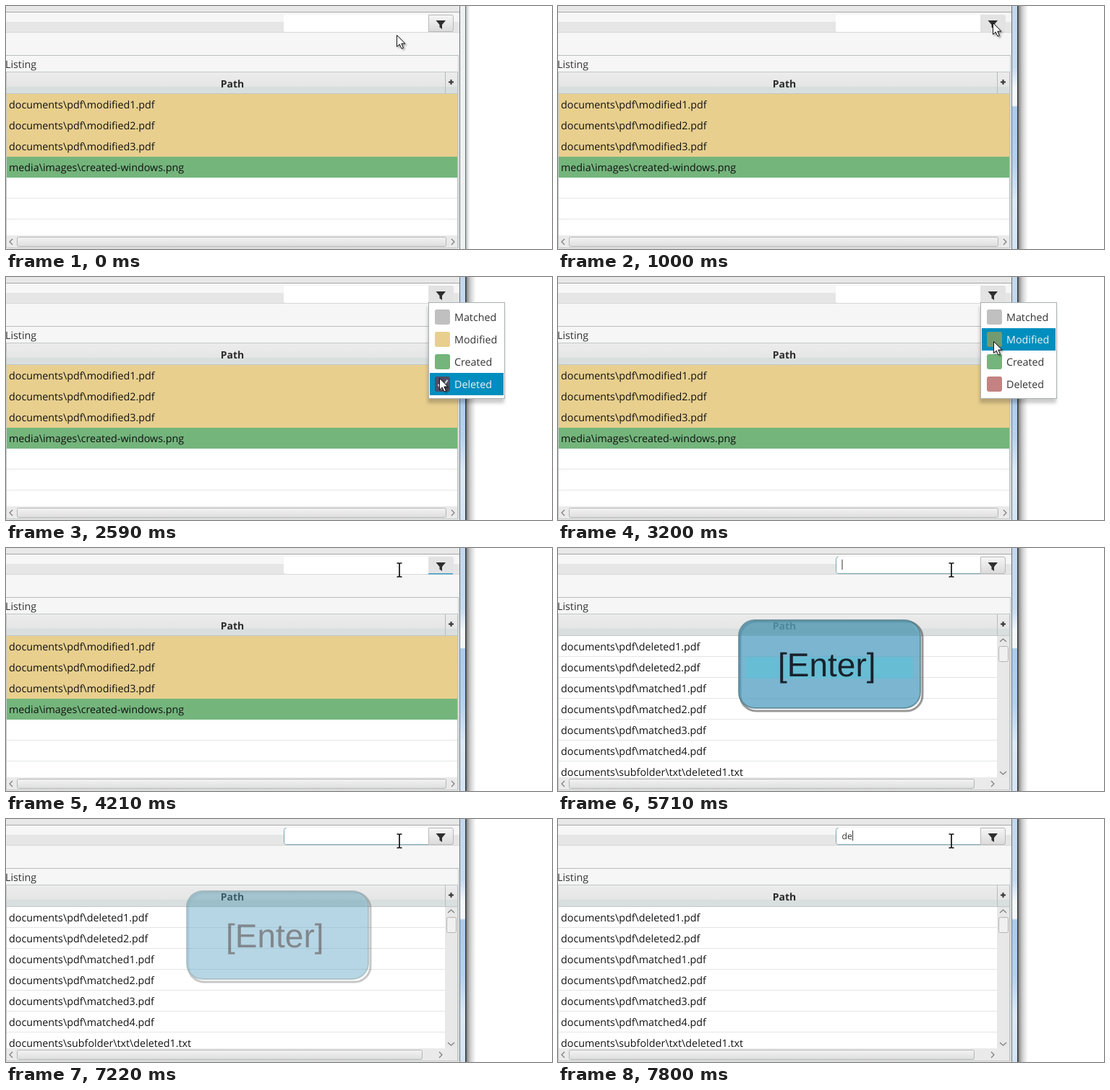
Recreate the animation shown at these times as an HTML page. Size 755x337 px, loop 8 s.

```html
<!DOCTYPE html>
<html lang="en">
<head>
<meta charset="utf-8">
<title>Filter listing</title>
<style>
html, body { margin: 0; width: 100%; height: 100%; overflow: hidden; background: #fff; }
svg { display: block; width: 755px; height: 337px; }
text { font: 14.3px "Open Sans", "Noto Sans", sans-serif; fill: #111; text-rendering: geometricPrecision; white-space: pre; }
.label { fill: #333; }
.head { font-weight: 700; font-size: 14px; fill: #2b2b2b; }
.typed { font-size: 12.2px; fill: #333; }
.key { font: 46px "Liberation Sans", Arial, sans-serif; fill: #18222c; }
.arrow { fill: none; stroke: #777; stroke-width: 1.1; }
#menu .frame { filter: drop-shadow(-1px 6px 2px rgba(0,0,0,.2)); }
#pointer { filter: drop-shadow(2px 2px 1px rgba(0,0,0,.35)); }
</style>
</head>
<body>
<svg viewBox="0 0 755 337">
  <defs>
    <linearGradient id="headFill" x2="0" y2="1"><stop stop-color="#ececec"/><stop offset="1" stop-color="#e2e2e2"/></linearGradient>
    <linearGradient id="buttonFill" x2="0" y2="1"><stop stop-color="#f6f6f6"/><stop offset="1" stop-color="#dadada"/></linearGradient>
    <linearGradient id="thumbFill" x2="0" y2="1"><stop stop-color="#f3f3f3"/><stop offset="1" stop-color="#dedede"/></linearGradient>
    <linearGradient id="glass" x2="0" y2="1">
      <stop stop-color="#c3d8ee"/><stop offset=".25" stop-color="#c6daf0"/><stop offset=".34" stop-color="#f4f8fc"/>
      <stop offset=".41" stop-color="#f4f8fc"/><stop offset=".415" stop-color="#a9cbee"/><stop offset=".65" stop-color="#b5d2f0"/>
      <stop offset=".8" stop-color="#dce9f6"/><stop offset="1" stop-color="#d5e4f4"/>
    </linearGradient>
    <linearGradient id="shade"><stop stop-color="#444" stop-opacity=".75"/><stop offset=".4" stop-color="#777" stop-opacity=".4"/><stop offset="1" stop-color="#999" stop-opacity="0"/></linearGradient>
  </defs>

  <rect width="628" height="337" fill="#f6f6f6"/>
  <rect width="627" height="8" fill="#e8e8e8"/>
  <rect y="8" width="627" height="1" fill="#a9a9a9"/>
  <rect y="22" width="627" height="14" fill="#e6e6e6"/>
  <rect y="36" width="627" height="1" fill="#d8d8d8"/>
  <rect y="68" width="626" height="1" fill="#b9bdbd"/>
  <rect x="625" y="69" width="1" height="268" fill="#c3c8c8"/>
  <text class="label" x="-1" y="86">Listing</text>

  <g id="table">
    <rect y="91" width="625" height="246" fill="#c3c8c8"/>
    <rect x="1" y="92" width="623" height="29" fill="url(#headFill)"/>
    <rect x="1" y="112" width="623" height="9" fill="#d8dfde"/>
    <rect x="607" y="92" width="1" height="29" fill="#b8bcbc"/>
    <path d="M612 105.5h7M615.5 102v7" stroke="#333" stroke-width="2"/>
    <text class="head" x="313" y="113" text-anchor="middle">Path</text>
    <rect x="1" y="122" width="623" height="196" fill="#fff"/>
    <g id="filtered"></g>
    <g id="full"></g>
    <rect x="1" y="318" width="623" height="17" fill="#eaeaea"/>
    <path class="arrow" d="M9 323l-4 4 4 4"/>
    <path class="arrow" id="rightArrow" d="M616 323l4 4-4 4"/>
    <rect id="thumb" x="15.5" y="320.5" width="593" height="13" rx="2" fill="url(#thumbFill)" stroke="#b4b4b4"/>
    <rect y="335" width="625" height="1" fill="#c3c8c8"/>
    <rect y="336" width="626" height="1" fill="#eee"/>
  </g>

  <g id="inactive">
    <rect x="628" width="7" height="337" fill="#eef1f2"/>
    <rect x="635" width="1" height="337" fill="#687373"/>
    <rect x="636" width="6" height="337" fill="url(#shade)" opacity=".55"/>
  </g>
  <g id="active">
    <rect x="628" width="7" height="337" fill="url(#glass)"/>
    <rect x="635" width="1.5" height="337" fill="#333a3e"/>
    <rect x="636" width="14" height="337" fill="url(#shade)"/>
  </g>
  <rect x="627" width="1" height="337" fill="#6d7474"/>

  <path d="M584 12H387q-3 0-3 3v18q0 3 3 3H584z" fill="#fff"/>
  <path id="focus" d="M584 35.5H387.500q-3 0-3-3V15.500q0-3 3-3" fill="none" stroke="#79a3aa"/>
  <path id="button" d="M584.500 12.500H616q2.500 0 2.500 2.500V33q0 2.500-2.500 2.500H584.500z"/>
  <rect id="buttonFocus" x="584" y="35" width="34" height="1.500" fill="#3c9dc8"/>
  <path d="M594.500 20h13.500l-5 6v6l-3.500-2.500V26z" fill="#2e2e2e"/>
  <text class="typed" id="typed" x="392.500" y="28"></text>
  <rect id="caret" y="16" width="1" height="14" fill="#333"/>

  <g id="menu">
    <rect class="frame" x="584.500" y="35.500" width="105" height="133" fill="#fff" stroke="#a9b0b2"/>
    <g id="items"></g>
  </g>

  <g id="banner">
    <rect x="252" y="102" width="252" height="124" rx="22" fill="none" stroke="#333" stroke-opacity=".5" stroke-width="3"/>
    <rect x="250" y="100" width="251" height="122" rx="22" fill="rgb(79,156,192)" fill-opacity=".75" stroke="#537f8d" stroke-opacity=".75" stroke-width="2"/>
    <path d="M252 121q4-19 22-20H476q18 1 22 20z" fill="#5e9699" fill-opacity=".3"/>
    <rect id="shine" x="259" y="151" width="232" height="30" fill="#5bc4d6" fill-opacity=".6"/>
    <text class="key" x="304" y="178">[Enter]</text>
  </g>

  <path id="pointer" d="M.5.5V16.500l3.700-3.500 2.700 6 2.500-1.100-2.600-5.800h5z" fill="#fff" stroke="#111"/>
  <path id="beam" d="M-3.500-9.500h2.500l1 1 1-1h2.500M0-9V9M-3.500 9.500h2.500l1-1 1 1h2.500" fill="none" stroke="#111" stroke-width="1.700"/>
</svg>
<script>
const LOOP = 8000;
const $ = id => document.getElementById(id);
const show = (id, on) => $(id).style.display = on ? "" : "none";

// time, x, y
const track = [
  [0, 540, 40], [260, 540, 40], [380, 565, 52], [520, 606, 50], [640, 611, 33], [740, 601, 23],
  [1290, 601, 23], [1500, 597, 79], [2050, 597, 79], [2230, 598, 112],
  [2470, 598, 112], [2650, 600, 154], [2930, 600, 154], [3200, 602, 89], [3470, 613, 52],
  [3860, 613, 52], [4010, 544, 30], [LOOP, 544, 30]
];
const items = [
  ["Matched", "rgb(139,139,139)"], ["Modified", "rgb(213,167,48)"],
  ["Created", "rgb(0,119,15)"], ["Deleted", "rgb(147,26,26)"]
];
const clicks = [3570, 1900, 2290, 2710];
const PRESS = 60;
const menuOpen = 1060, menuClose = 4210, fieldFocus = 4830, enter = 5650;
const blinks = [[4830, 5390], [5680, 6170], [6700, 7200], [7610, LOOP]];

const row = (i, name, fill, width) =>
  `<rect x="1" y="${122 + 29 * i}" width="${width}" height="29" fill="${fill}"/>` +
  (fill === "#fff" ? `<rect x="1" y="${150 + 29 * i}" width="${width}" height="1" fill="#e3e6e6"/>` : "") +
  `<text x="4" y="${142 + 29 * i}">${name}</text>`;

const pdf = name => `documents\\pdf\\${name}.pdf`;
$("filtered").innerHTML =
  [1, 2, 3].map((n, i) => row(i, pdf("modified" + n), "#e8cf8e", 623)).join("") +
  row(3, "media\\images\\created-windows.png", "#74b57c", 623) +
  row(4, "", "#fff", 623) + row(5, "", "#fff", 623);
$("full").innerHTML =
  ["deleted1", "deleted2", "matched1", "matched2", "matched3", "matched4"]
    .map((name, i) => row(i, pdf(name), "#fff", 606)).join("") +
  row(6, "documents\\subfolder\\txt\\deleted1.txt", "#fff", 606) +
  `<rect x="607" y="122" width="17" height="196" fill="#e8e8e8"/>
   <path class="arrow" d="M611 130l4.500-4 4.500 4M611 310l4.500 4 4.500-4"/>
   <rect x="609.500" y="136.500" width="13" height="21" rx="2" fill="#f0f0f0" stroke="#b4b4b4"/>`;

$("items").innerHTML = items.map(([name, color], i) => `
  <g transform="translate(0 ${31 * i})">
    <rect id="hover${i}" x="586" y="40" width="102" height="31" fill="#008ebe"/>
    <rect x="593" y="45" width="21" height="21" rx="3" fill="${color}" fill-opacity=".545"/>
    <g id="check${i}" fill="none">
      <path d="M597.500 56l4.500 6 8.500-12" stroke="#777" stroke-opacity=".7" stroke-width="3.200"/>
      <path d="M597.500 56l4.500 6 8.500-12" stroke="#d9dedb" stroke-width="1.900"/>
    </g>
    <text id="name${i}" x="620" y="61">${name}</text>
  </g>`).join("");

function position(t) {
  const i = track.findIndex(p => p[0] > t);
  const [t0, x0, y0] = track[i - 1], [t1, x1, y1] = track[i];
  const k = (t - t0) / (t1 - t0);
  return [x0 + (x1 - x0) * k, y0 + (y1 - y0) * k];
}

function drawMenu(t) {
  const open = t >= menuOpen && t < menuClose;
  show("menu", open);
  if (!open) return;
  // The last row stays highlighted once the pointer has left it.
  const over = Math.floor((position(Math.min(t, 3800))[1] - 40) / 31);
  items.forEach((_, i) => {
    const pressed = t >= clicks[i] && t < clicks[i] + PRESS;
    const hovered = over === i && !pressed;
    const toggled = t >= clicks[i] + PRESS;
    show("hover" + i, hovered);
    show("check" + i, (i > 0) !== toggled);
    $("name" + i).style.fill = hovered ? "#f2f2f2" : "#333";
  });
}

function drawField(t) {
  const text = t >= 7790 ? "de" : t >= 7610 ? "d" : "";
  $("typed").textContent = text;
  show("focus", t >= fieldFocus);
  show("caret", blinks.some(([on, off]) => t >= on && t < off));
  $("caret").setAttribute("x", 392.5 + 7.3 * text.length);
  const flat = t >= 1000 && t < fieldFocus;
  $("button").setAttribute("fill", flat ? "#e3e3e3" : "url(#buttonFill)");
  $("button").setAttribute("stroke", flat ? "#e3e3e3" : "#b9b9b9");
  show("buttonFocus", t >= menuClose && t < fieldFocus);
}

function drawListing(t) {
  const all = t >= enter;
  show("filtered", !all);
  show("full", all);
  $("thumb").setAttribute("width", all ? 560 : 593);
  $("rightArrow").setAttribute("transform", `translate(${all ? -17 : 0} 0)`);
}

function drawBanner(t) {
  const rise = Math.min(1, (t - enter + 30) / 90);
  const fall = Math.min(1, (7790 - t) / 1050);
  const level = t < enter ? 0 : Math.max(0, Math.min(rise, fall));
  $("banner").style.opacity = level;
  show("shine", fall === 1);
}

function drawPointer(t) {
  const [x, y] = position(t);
  const inField = x < 584 && y < 37;
  show("pointer", !inField);
  show("beam", inField);
  $("pointer").setAttribute("transform", `translate(${Math.round(x)} ${Math.round(y)})`);
  $("beam").setAttribute("transform", `translate(${Math.round(x)} ${Math.round(y) + .5})`);
}

function render(t) {
  show("active", t >= 1000);
  show("inactive", t < 1000);
  drawMenu(t);
  drawField(t);
  drawListing(t);
  drawBanner(t);
  drawPointer(t);
}

const start = performance.now();
function tick() {
  render((performance.now() - start) % LOOP);
  requestAnimationFrame(tick);
}
tick();
</script>
</body>
</html>
```
